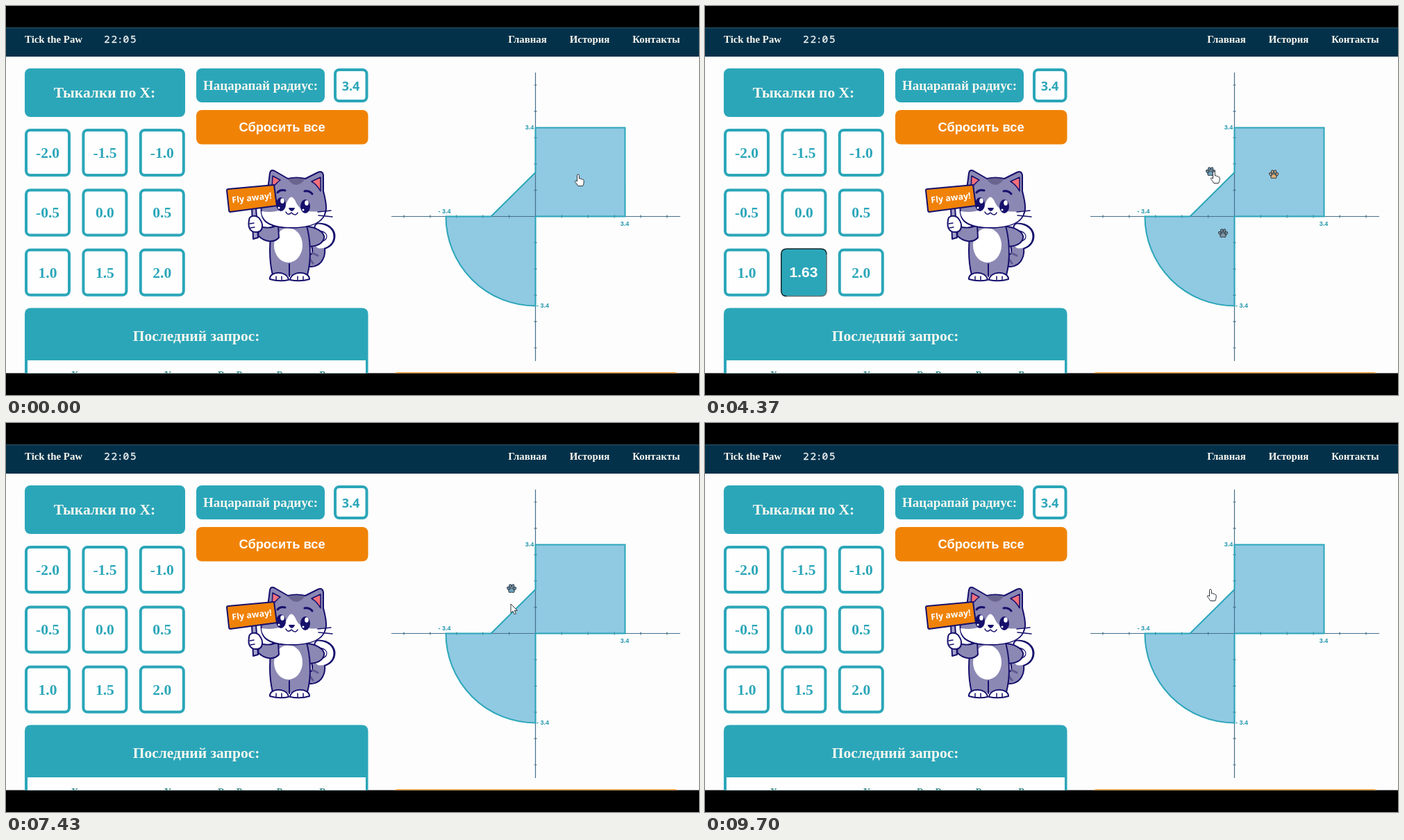
An HTML page for the animation above (9730 ms loop, 998 by 561 pixels).

```html
<!DOCTYPE html>
<html lang="ru">
<head>
<meta charset="utf-8">
<title>Area check</title>
<style>
  html, body { margin: 0; width: 100%; height: 100%; overflow: hidden; background: #000; }
  svg { display: block; width: 100%; height: 100%; }
  text { font-weight: bold; text-anchor: middle; }
  .serif { font-family: "Liberation Serif", "Times New Roman", serif; fill: #f9f8f0; }
  .sans { font-family: "Liberation Sans", Arial, sans-serif; fill: #fff; }
  .teal { fill: #2ba6b9; }
  .nav { font-size: 14.85px; }
  .big { font-size: 21.5px; }
  .field { fill: #fefefe; stroke: #2ba6b9; stroke-width: 4; }
  .mark { font-size: 9px; }
  .axis { stroke: #466f8c; stroke-width: 1.2; fill: none; }
  .ink { stroke: #16106c; stroke-width: 2; stroke-linejoin: round; stroke-linecap: round; }
  .line { fill: none; }
  .fur { fill: #8b88b4; }
  .white { fill: #fff; }
  .pink { fill: #f36f7b; }
  .navy { fill: #16106c; }
</style>
</head>
<body>
<svg viewBox="0 0 998 561" preserveAspectRatio="none">
  <defs>
    <clipPath id="view"><rect y="31" width="998" height="498.5"/></clipPath>
    <g id="paw" stroke="#36424d" stroke-width="1.1">
      <ellipse cx="-4.6" cy="-.6" rx="1.6" ry="2.1" transform="rotate(-25 -4.6 -.6)"/>
      <ellipse cx="-1.8" cy="-4" rx="1.6" ry="2.2"/>
      <ellipse cx="2.2" cy="-4" rx="1.6" ry="2.2"/>
      <ellipse cx="4.8" cy="-.4" rx="1.6" ry="2.1" transform="rotate(25 4.8 -.4)"/>
      <path d="M0 -1C2 -1 4.6 2.4 4 4.4C3.3 6.2 1.5 5 0 5S-3.3 6.2 -4 4.4C-4.6 2.4 -2 -1 0 -1Z"/>
    </g>
  </defs>
  <rect width="998" height="561"/>
  <g clip-path="url(#view)">
    <rect y="31" width="998" height="499" fill="#fdfdfd"/>
    <rect y="31" width="998" height="42" fill="#04314a"/>
    <rect y="31" width="998" height="1" fill="#2c5b70"/>

    <g class="serif nav">
      <text x="27" y="53" style="text-anchor:start">Tick the Paw</text>
      <text x="751" y="53">Главная</text>
      <text x="840.5" y="53">История</text>
      <text x="936.5" y="53">Контакты</text>
    </g>
    <text x="165.3" y="53.3" font-family="'DejaVu Sans', sans-serif" font-size="13.8" letter-spacing="1.7" fill="#eef3f2" stroke="#eef3f2" stroke-width=".3" style="font-weight:normal">22:05</text>
    <path d="M169.5 51.5L175 45" stroke="#eef3f2" stroke-width="1.2"/>

    <g class="teal">
      <rect x="27" y="90" width="231" height="70" rx="8"/>
      <rect x="274" y="90" width="185" height="49" rx="8"/>
      <path d="M27 540V444Q27 435.500 36 435.500H512Q521.500 435.500 521.500 444V540Z"/>
    </g>
    <rect x="31" y="511" width="487" height="30" fill="#fefefe"/>
    <rect x="274" y="150" width="247.500" height="49.500" rx="8" fill="#f08306"/>
    <rect x="556" y="528" width="415" height="40" rx="8" fill="#f0a23c"/>
    <rect class="field" x="474" y="92" width="45.500" height="45" rx="6"/>
    <text class="serif big" x="142" y="132">Тыкалки по X:</text>
    <text class="serif" x="366.500" y="121" font-size="19">Нацарапай радиус:</text>
    <text class="serif big" x="274" y="483">Последний запрос:</text>
    <text class="sans" x="397.500" y="181" font-size="18.300">Сбросить все</text>
    <text class="teal" x="496.500" y="122.300" font-family="'Open Sans', sans-serif" font-size="18">3.4</text>
    <g class="serif" font-size="14" style="fill:#2b7f7c">
      <text x="99" y="537">X</text><text x="233" y="537">Y</text><text x="310" y="537">R</text>
      <text x="336" y="537">P</text><text x="394" y="537">P</text><text x="456" y="537">B</text>
    </g>

    <g id="keys"></g>
    <g id="active">
      <rect x="109.500" y="350" width="65.500" height="68.500" rx="8" class="teal"/>
      <path d="M175 358V410.500Q175 418.500 167 418.500H117.500" fill="none" stroke="#6b7475" stroke-width="1.5"/>
      <path d="M117.500 418.500Q109.800 418.500 109.800 410.500V358Q109.800 350.200 117.500 350.200H167Q175 350.200 175 358" fill="none" stroke="#12282d" stroke-width="1.5"/>
      <text class="sans" x="142" y="391.300" font-size="21">1.63</text>
    </g>

    <!-- cat -->
    <g class="ink">
      <path class="line" d="M430 365C450 373 452 355 449 345" stroke-width="20"/>
      <path class="line" d="M449 345C472 348 476 319 450 319" stroke-width="13"/>
      <path class="line" d="M430 365C450 373 452 355 449 345" stroke="#8b88b4" stroke-width="16"/>
      <path class="line" d="M451 345C471 346 474 320 450 319" stroke="#fff" stroke-width="9"/>
      <path class="line" d="M441 356l8 4M437 364l5 7" stroke="#5f5a91" stroke-width="3"/>
      <path class="fur" d="M428 318C446 317 460 327 458 335C455 346 440 348 430 346Z"/>
      <path class="fur" d="M385 314C378 338 379 368 384 388H434C440 366 439 336 432 314Z"/>
      <path class="line" d="M384 388L434 388" stroke="#8b88b4"/>
      <ellipse class="white" cx="406.500" cy="345" rx="20.500" ry="25" stroke="none"/>
      <path class="line" d="M408 372V390"/>
      <path class="white" d="M380 394C379 382 405 381 407 395Q394 398 380 394ZM409 395C411 381 437 382 437 394Q424 398 409 395Z"/>
      <path class="line" d="M389 390v5M397 390v5M420 390v5M428 390v5" stroke-width="1.500"/>
      <path class="fur" d="M392 316C380 321 374 320 365 318L363 331C374 342 387 341 393 334Z"/>
      <path d="M354 291L360 291L363 334L356 336Z" fill="#a6a2ca"/>
      <path class="white" d="M350 309C350 301 362 301 366 308C371 315 370 325 362 326C352 327 348 320 350 309Z"/>
      <path class="line" d="M351 314l6-1M352 320l6-1" stroke-width="1.400"/>
      <path class="fur" d="M377 264L380 241Q381 235 387 238L406 249Q418 246 431 249L449 240Q456 237 457 244L457 267C463 290 463 299 453 309C435 323 389 323 374 311C362 300 369 273 377 264Z"/>
      <path class="white" stroke="none" d="M368 296C382 298 399 298 404 284Q411 267 418 284C424 298 444 298 459 295C458 312 438 319 412 319C387 319 368 312 368 296Z"/>
      <path fill="#69658f" stroke="none" d="M406 250Q418 247 430 250Q426 257 418 258Q410 257 406 250Z"/>
      <path class="pink" stroke-width="1.500" d="M384 245L383 264Q388 256 395 251ZM453 247V267Q448 258 440 253Z"/>
      <path class="line" d="M391 269Q395 264 402 266M430 267Q437 266 441 271" stroke-width="3"/>
      <g class="navy" stroke="none">
        <ellipse cx="396" cy="286" rx="7" ry="10"/>
        <ellipse cx="431" cy="289" rx="7" ry="10"/>
        <path d="M407 291H416Q415 295 411.500 296Q408 295 407 291Z"/>
      </g>
      <g class="white" stroke="none">
        <ellipse cx="398" cy="281" rx="2.800" ry="3.800"/>
        <ellipse cx="433" cy="284" rx="2.800" ry="3.800"/>
        <circle cx="393" cy="291" r="1.500"/>
        <circle cx="428" cy="294" r="1.500"/>
      </g>
      <path class="line" d="M403 297Q406 303 411 298Q417 304 420 298M449 297L468 295M450 302L470 304" stroke-width="1.600"/>
      <path d="M318 266Q318 264 320 264L386 258L390 288L323 297Q321 297 321 294Z" fill="#f08208"/>
      <text x="354" y="281" transform="rotate(-6.500 354 277)" font-family="'Open Sans', sans-serif" font-size="12.500" fill="#fff" stroke="none">Fly away!</text>
    </g>

    <!-- plot -->
    <path fill="#90c9e2" d="M762.500 240V175.500H891.500V303.500H762.500V432.500A129 129 0 0 1 633.500 303.500H698.500Z"/>
    <path id="axes" class="axis"/>
    <path fill="none" stroke="#2ba6b9" stroke-width="2" d="M762.500 240V175.500H891.500V303.500H762.500V432.500A129 129 0 0 1 633.500 303.500H698.500Z"/>
    <g class="mark" font-family="'Liberation Sans', Arial, sans-serif" fill="#2497ad">
      <text x="754" y="177.500">3.4</text>
      <text x="891" y="316.500">3.4</text>
      <text x="631.500" y="298.500">- 3.4</text>
      <text x="773" y="435">- 3.4</text>
    </g>
    <g id="paws"></g>
    <g id="cursor" fill="#fff" stroke="#30363a" stroke-width="1" stroke-linejoin="round">
      <path id="arrow" d="M0 0V13L3 10.300L5.300 15L7.500 14L5.300 9.500H9.300Z"/>
      <path id="hand" d="M-1.500 1.200Q-1.300 -.4 .2 -.2Q1.300 0 1.400 1.400V6Q3 5 4 6.500Q5.500 5.700 6.300 7.300Q8 7 8.200 8.800V11Q8 13.500 6.700 16.500H-.2Q-2 13 -4.600 10.500Q-4.800 8.600 -2.900 8.900L-1.500 10Z"/>
    </g>
  </g>
</svg>
<script>
const LOOP = 9730;
const $ = id => document.getElementById(id);

function add(parent, name, attrs, text = "") {
  const el = document.createElementNS("http://www.w3.org/2000/svg", name);
  for (const key in attrs) el.setAttribute(key, attrs[key]);
  el.textContent = text;
  parent.append(el);
  return el;
}

for (let i = 0; i < 9; i++) {
  const x = 27 + (i % 3) * 82.4, y = 177 + Math.floor(i / 3) * 86.4;
  add($("keys"), "rect", { class: "field", x: x + 2, y: y + 2, width: 62, height: 65, rx: 6 });
  add($("keys"), "text", { class: "serif big", x: x + 33, y: y + 42, style: "fill:#2ba6b9" }, (i / 2 - 2).toFixed(1));
}

let axes = "M555 303.5H971M762.5 96V512";
for (let i = -5; i <= 5; i++) {
  const d = i * 37.9;
  axes += `M${762.5 + d} 301.5v4M760.5 ${303.5 + d}h4`;
}
$("axes").setAttribute("d", axes);

const spots = [
  { x: 819, y: 243, fill: "#e2b27c", on: 2300, off: 5850 },
  { x: 746, y: 328, fill: "#8199a8", on: 3650, off: 6750 },
  { x: 728, y: 239, fill: "#6fa3c0", on: 4300, off: 8000 }
];
for (const s of spots)
  s.el = add($("paws"), "use", { href: "#paw", x: s.x, y: s.y, fill: s.fill });

// time, x, y of the pointer tip
const path = [
  [0, 824, 243], [2450, 824, 243], [2900, 803, 263], [3450, 751, 328], [3900, 751, 328],
  [4250, 733, 239], [4900, 733, 239], [5500, 820, 247], [6000, 820, 247], [6550, 751, 328],
  [6950, 751, 328], [7430, 727, 261], [7750, 728, 240], [LOOP, 728, 240]
];

function pointerAt(t) {
  const i = path.findIndex(p => p[0] > t);
  const [t0, x0, y0] = path[i - 1], [t1, x1, y1] = path[i];
  const k = (t - t0) / (t1 - t0);
  return [x0 + (x1 - x0) * k, y0 + (y1 - y0) * k];
}

const show = (el, on) => el.setAttribute("visibility", on ? "visible" : "hidden");

function draw(now) {
  const t = Math.max(0, now) % LOOP;
  const [x, y] = pointerAt(t);
  const near = spots.some(s => Math.hypot(x - s.x - 5, y - s.y) < 14);
  for (const s of spots) show(s.el, t >= s.on && t < s.off);
  show($("active"), t >= spots[0].on && t < spots[0].off);
  show($("hand"), near);
  show($("arrow"), !near);
  $("cursor").setAttribute("transform", `translate(${x} ${y})`);
}

const start = performance.now();
function tick() {
  draw(performance.now() - start);
  requestAnimationFrame(tick);
}
tick();
</script>
</body>
</html>
```
